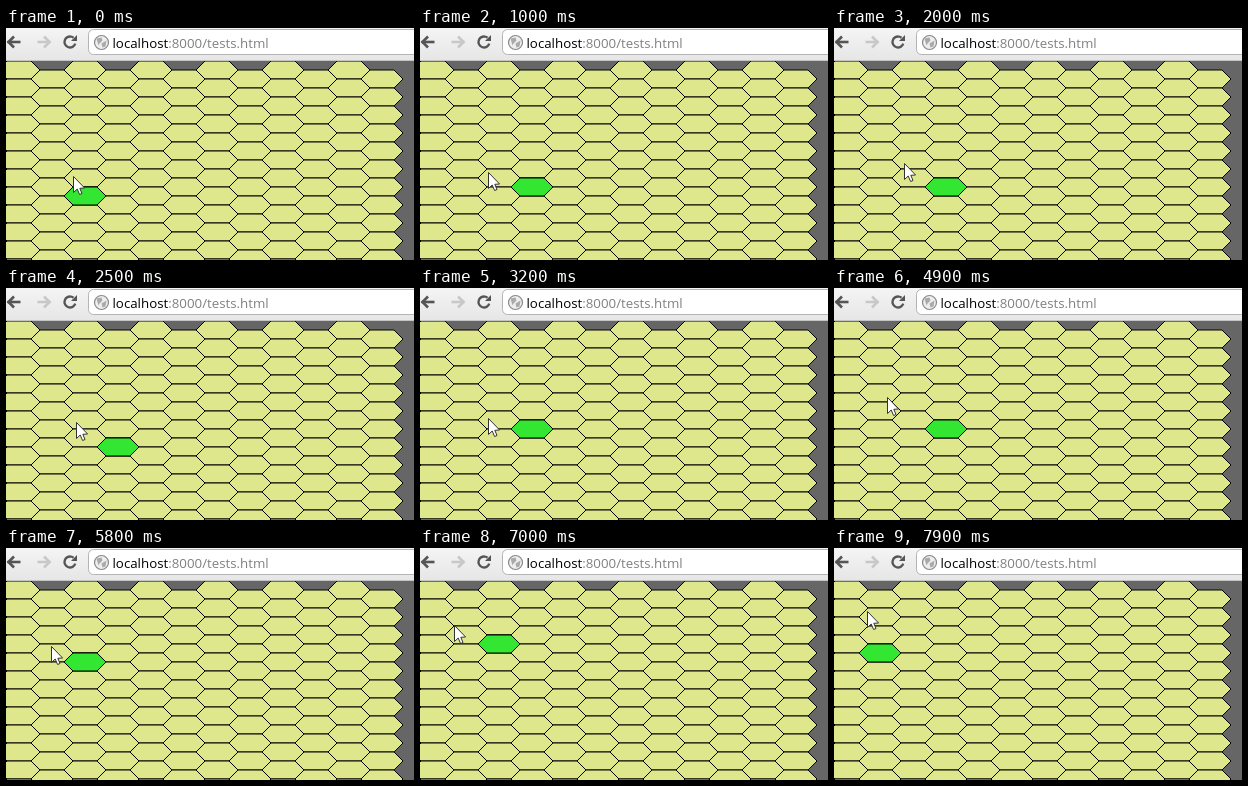
An HTML page with a canvas for the animation above (8000 ms loop, 408 px wide and 232 px high).

```html
<!DOCTYPE html>
<html>
<head>
<meta charset="utf-8">
<style>
html, body { margin: 0; width: 100%; height: 100%; overflow: hidden; background: #666; }
canvas { display: block; }
</style>
</head>
<body>
<canvas id="stage" width="408" height="232"></canvas>
<script>
const ctx = document.getElementById('stage').getContext('2d');
const LOOP = 8000, STEP = 100, PAUSE = 0.25;
const COL = 33, ROW = 18, TOP = 33;

// Key points: time, pointer position, highlighted cell
const keys = [
  { t: 0, x: 67, y: 148, col: 2, row: 7 },
  { t: 2000, x: 70, y: 135, col: 3, row: 6 },
  { t: 3200, x: 68, y: 130, col: 3, row: 5 },
  { t: 4900, x: 53, y: 109, col: 3, row: 5 },
  { t: 5800, x: 45, y: 98, col: 2, row: 4 },
  { t: 6500, x: 36, y: 84, col: 2, row: 4 },
  { t: 7000, x: 34, y: 77, col: 2, row: 3 },
  { t: 7900, x: 33, y: 63, col: 1, row: 3 },
];

function trace(points) {
  ctx.beginPath();
  points.forEach(([x, y]) => ctx.lineTo(x, y));
}

function stroke(color, width) {
  ctx.strokeStyle = color;
  ctx.lineWidth = width;
  ctx.stroke();
}

function fill(color) {
  ctx.fillStyle = color;
  ctx.fill();
}

function polygon(points, inside, outline) {
  trace(points);
  ctx.closePath();
  fill(inside);
  if (outline) stroke(outline, 1);
}

function circle(x, y, r, from = 0, to = 7) {
  ctx.beginPath();
  ctx.arc(x, y, r, from, to);
}

function hexagon(col, row, color) {
  const x = 13 + col * COL;
  const y = TOP + 9 + row * ROW + (col % 2) * 9;
  polygon([[x - 21, y], [x - 12, y - 9], [x + 12, y - 9],
    [x + 21, y], [x + 12, y + 9], [x - 12, y + 9]], color, '#000');
}

function arrow(x, dir, color) {
  trace([[x, 14], [x + dir * 13, 14]]);
  stroke(color, 2.6);
  trace([[x + dir * 6.5, 8.5], [x + dir, 14], [x + dir * 6.5, 19.5]]);
  stroke(color, 2.6);
}

function globe(x, y) {
  circle(x, y, 7);
  fill('#eee');
  stroke('#888', 1.2);
  polygon([[x - 5, y - 4], [x, y - 5], [x + 1, y - 2], [x - 2, y + 1], [x - 3, y + 3]], '#aaa');
  polygon([[x, y + 1], [x + 5, y - 2], [x + 4, y + 4], [x + 1, y + 5]], '#aaa');
}

function toolbar() {
  const shade = ctx.createLinearGradient(0, 0, 0, TOP);
  shade.addColorStop(0, '#f4f4f4');
  shade.addColorStop(1, '#e6e6e6');
  ctx.fillStyle = shade;
  ctx.fillRect(0, 0, 408, TOP);
  ctx.fillStyle = '#c4c4c4';
  ctx.fillRect(0, TOP - 1, 408, 1);

  arrow(1.5, 1, '#555');
  arrow(44.5, -1, '#c8c8c8');
  circle(64, 14, 5.5, 0.3, 5.4);
  stroke('#555', 2.3);
  polygon([[71, 7], [71, 13], [65, 13]], '#555');

  ctx.beginPath();
  ctx.roundRect(82.5, 1.5, 340, 25, 5);
  fill('#fff');
  stroke('#b4b4b4', 1);
  globe(95.5, 14.5);

  ctx.font = '13.3px "Open Sans", sans-serif';
  ctx.fillStyle = '#000';
  ctx.fillText('localhost', 106.5, 19.5);
  const hostWidth = ctx.measureText('localhost').width;
  ctx.fillStyle = '#808080';
  ctx.fillText(':8000/tests.html', 106.5 + hostWidth, 19.5);
}

function pointer(x, y) {
  ctx.save();
  ctx.translate(Math.round(x), Math.round(y));
  polygon([[0.5, 0.5], [0.5, 16.5], [4.2, 13], [6.6, 18.5], [9, 17.5], [6.8, 12.3], [11.6, 12]],
    '#fff', '#333');
  ctx.restore();
}

function draw(now) {
  const t = Math.floor(now % LOOP / STEP) * STEP;
  const next = Math.max(1, keys.findIndex(key => key.t >= t));
  const [a, b] = [keys[next - 1], keys[next]];
  const progress = (t - a.t) / (b.t - a.t);
  const moved = Math.max(0, (progress - PAUSE) / (1 - PAUSE));
  const hover = progress < 0.5 ? a : b;

  ctx.fillStyle = '#666';
  ctx.fillRect(0, 0, 408, 232);
  for (let col = 0; col < 12; col++)
    for (let row = 0; row < 12; row++) hexagon(col, row, '#dfe78c');
  hexagon(hover.col, hover.row, '#32e632');
  toolbar();
  pointer(a.x + (b.x - a.x) * moved, a.y + (b.y - a.y) * moved);
  requestAnimationFrame(() => draw(performance.now()));
}
draw(0);
</script>
</body>
</html>
```
